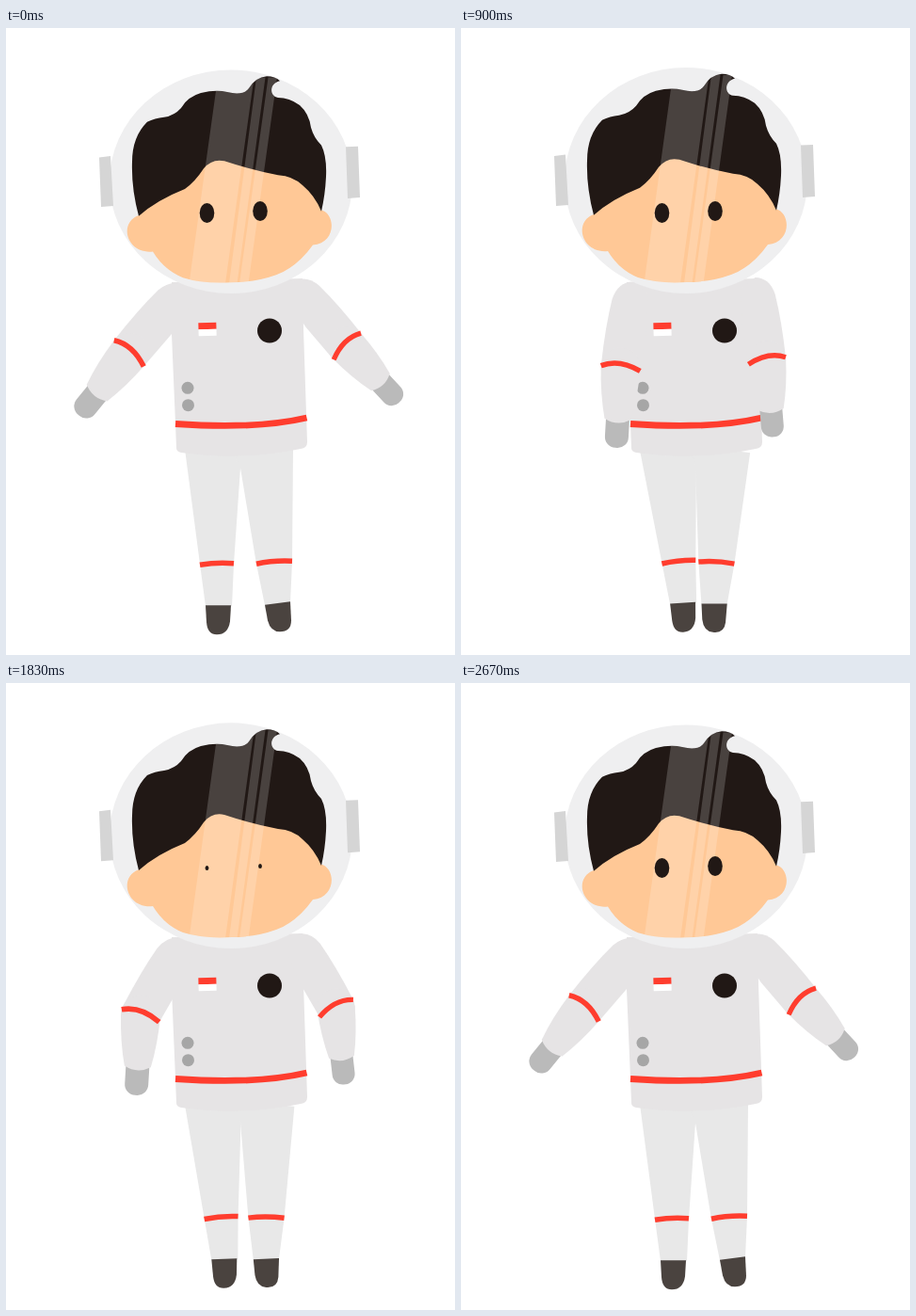
An HTML page that plays this animation: 477x666 px, repeating every 2.7 s.

```html
<!DOCTYPE html>
<html lang="en">
<head>
<meta charset="utf-8">
<title>Astronaut</title>
<style>
  html, body { margin: 0; width: 100%; height: 100%; overflow: hidden; background: #fff; }
  svg { display: block; width: 100%; height: 100%; }
  .suit { fill: #e6e4e5; }
  .leg { fill: #e8e8e8; }
  .boot { fill: #4a433f; }
  .glove { fill: #bababa; }
  .button { fill: #a6a6a6; }
  .dark { fill: #211815; }
  .skin { fill: #ffc896; }
  .band { fill: none; stroke: #ff3d2e; stroke-width: 5.5; }
</style>
</head>
<body>
<svg viewBox="0 0 477 666">
  <defs>
    <path id="hair" transform="translate(0 -1.2)" d="M141 200 Q133 170 134 142 Q134 115 150 99 Q158 95 168 94 Q179 92 186 84
      Q193 72 207 68 Q223 64 235 67 Q252 71 258 63 Q265 51 277 50 Q286 50 291 55
      C280 57 279 71 289 73 Q301 73 312 81 Q322 90 324 105 Q327 116 335 124 Q341 136 340 158
      Q339 178 335 195 Q328 178 315 167 Q305 157 289 156 Q262 151 232 141 Q219 138 210 149
      Q201 163 190 171 Q160 183 141 200Z"/>
    <path id="face" d="M141 198 L150 175 L212 125 L320 145 L335 186 L334 192
      C351 196 351 228 326 230 Q309 254 287 262 Q265 270 240 270 Q210 272 188 265 Q168 257 156 237
      C128 240 119 206 141 198Z"/>
    <clipPath id="visor"><use href="#hair"/><use href="#face"/></clipPath>
    <g id="upperArm">
      <path class="suit" d="M-21 76 Q-21 35 -17 5 Q-13 -14 3 -16 L20 -5 L23 32 L21 76Z"/>
      <circle class="suit" cy="76" r="21"/>
    </g>
    <g id="forearm">
      <rect class="glove" x="-12.5" y="44" width="25" height="41.5" rx="11.5"/>
      <path class="suit" d="M-21 0 Q-20 30 -14 55 Q0 63 14 55 Q20 30 21 0Z"/>
    </g>
    <path id="armBand" class="band" d="M-21 1 Q-3 -9 21 1"/>
  </defs>

  <g transform="translate(0 1.2)">
    <g id="leftLeg">
      <path class="leg" d="M190 446 L206 568 L212 613 L240 613 L242 568 L249 466 L256 446Z"/>
      <path class="boot" d="M212 612 L239 612 L238 629 Q236 643 224 643 Q214 643 213 630Z"/>
      <path class="band" d="M206 569 Q224 566 242 567.5"/>
    </g>
    <g id="rightLeg">
      <path class="leg" d="M240 446 L249 466 L266 568 L275 612 L302 609 L304 566 L305 446Z"/>
      <path class="boot" d="M275 611.5 L302 608 L303 628 Q303 640 291 640 Q281 640 278 628Z"/>
      <path class="band" d="M266 568 Q284 564 304 565"/>
    </g>
  </g>

  <path class="suit" d="M176 270 L315 266 L316 320 L320 440 Q320 446 313 447 Q250 460 186 451 Q181 450 181 446 L180 420 L176 325Z"/>
  <path class="band" style="stroke-width:6.8" d="M180 420.500 Q266 426.500 319.500 414"/>
  <circle class="button" cx="193" cy="382.300" r="6.5"/>
  <circle class="button" cx="193.5" cy="400.700" r="6.5"/>
  <g transform="rotate(-1.5 214 320)">
    <path fill="#ff3d2e" d="M204.5 313h19v7h-19z"/>
    <path fill="#fff" d="M204.5 320h19v7h-19z"/>
  </g>
  <circle class="dark" cx="280" cy="321.5" r="13"/>

  <g id="leftArm" transform="translate(178 285)"></g>
  <g id="rightArm" transform="translate(317 280) scale(-.96 .96)"></g>

  <g id="head">
    <ellipse cx="239" cy="162" rx="129" ry="120" fill="#efeff0"/>
    <path fill="#d5d5d5" d="M99 136 L111 134.500 L114 188 L101 189Z M361 124.500 L374 124 L376 179 L363 180Z"/>
    <use href="#face" class="skin"/>
    <use href="#hair" class="dark"/>
    <path clip-path="url(#visor)" fill="#fff" fill-opacity=".18"
      d="M225 50 L263.500 50 L232.500 275 L194 275Z M266 50 L275.500 50 L245 275 L236.500 275Z M278.500 50 L288 50 L257 275 L247.500 275Z"/>
  </g>
  <g class="dark">
    <ellipse id="leftEye" cx="213.5" cy="196.5"/>
    <ellipse id="rightEye" cx="270" cy="194.5"/>
  </g>
</svg>
<script>
const LOOP = 2700, OPEN_START = 1200, OPEN_TIME = LOOP - OPEN_START;
const BLINK_MID = 1853, BLINK_HALF = 90;
const get = id => document.getElementById(id);
const mix = (a, b, k) => a + (b - a) * k;
const swing = x => (1 - Math.cos(Math.PI * x)) / 2;

for (const id of ['leftArm', 'rightArm']) {
  get(id).innerHTML = `<g><use href="#upperArm"/>
    <g><use href="#forearm"/></g><g><use href="#armBand"/></g></g>`;
}

function poseArm(id, angle, bend, bandTilt) {
  const arm = get(id).firstElementChild;
  const [, fore, band] = arm.children;
  arm.setAttribute('transform', `rotate(${angle})`);
  fore.setAttribute('transform', `translate(0 76) rotate(${bend})`);
  band.setAttribute('transform', `translate(0 76) rotate(${bandTilt})`);
}

function draw(t) {
  let arms, legs, head, drag = 0; // arms, legs, head: 0 spread, 1 closed
  if (t < OPEN_START) {
    arms = legs = head = 1 - Math.exp(-0.916 * (t / 240) ** 2);
  } else {
    const x = (t - OPEN_START) / OPEN_TIME;
    arms = (1 - x) ** 2;
    legs = 1 - swing(x);
    head = 1 - swing(x) ** 2;
    drag = -26 * (x < 0.28 ? swing(x / 0.28) : swing((1 - x) / 0.72));
  }

  const angle = mix(38, 6.3, arms);
  const leftBend = mix(1, -3, arms) + drag;
  const rightBend = mix(5, -1.6, arms) + drag;
  poseArm('leftArm', angle, leftBend, leftBend / 2 + 3);
  poseArm('rightArm', angle, rightBend, rightBend / 4 + 5);
  get('leftLeg').setAttribute('transform', `rotate(${-3.6 * legs} 190 450)`);
  get('rightLeg').setAttribute('transform', `rotate(${7.6 * legs} 275 464)`);
  get('head').setAttribute('transform',
    `translate(0 282) scale(1 ${mix(0.9895, 1, head)}) translate(0 -282)`);

  const eye = Math.min(1, Math.abs(t - BLINK_MID) / BLINK_HALF);
  for (const id of ['leftEye', 'rightEye']) {
    get(id).setAttribute('rx', 7.8 * eye);
    get(id).setAttribute('ry', 10.5 * eye);
  }
}

const start = performance.now();
function frame() {
  draw((performance.now() - start) % LOOP);
  requestAnimationFrame(frame);
}
frame();
</script>
</body>
</html>
```
